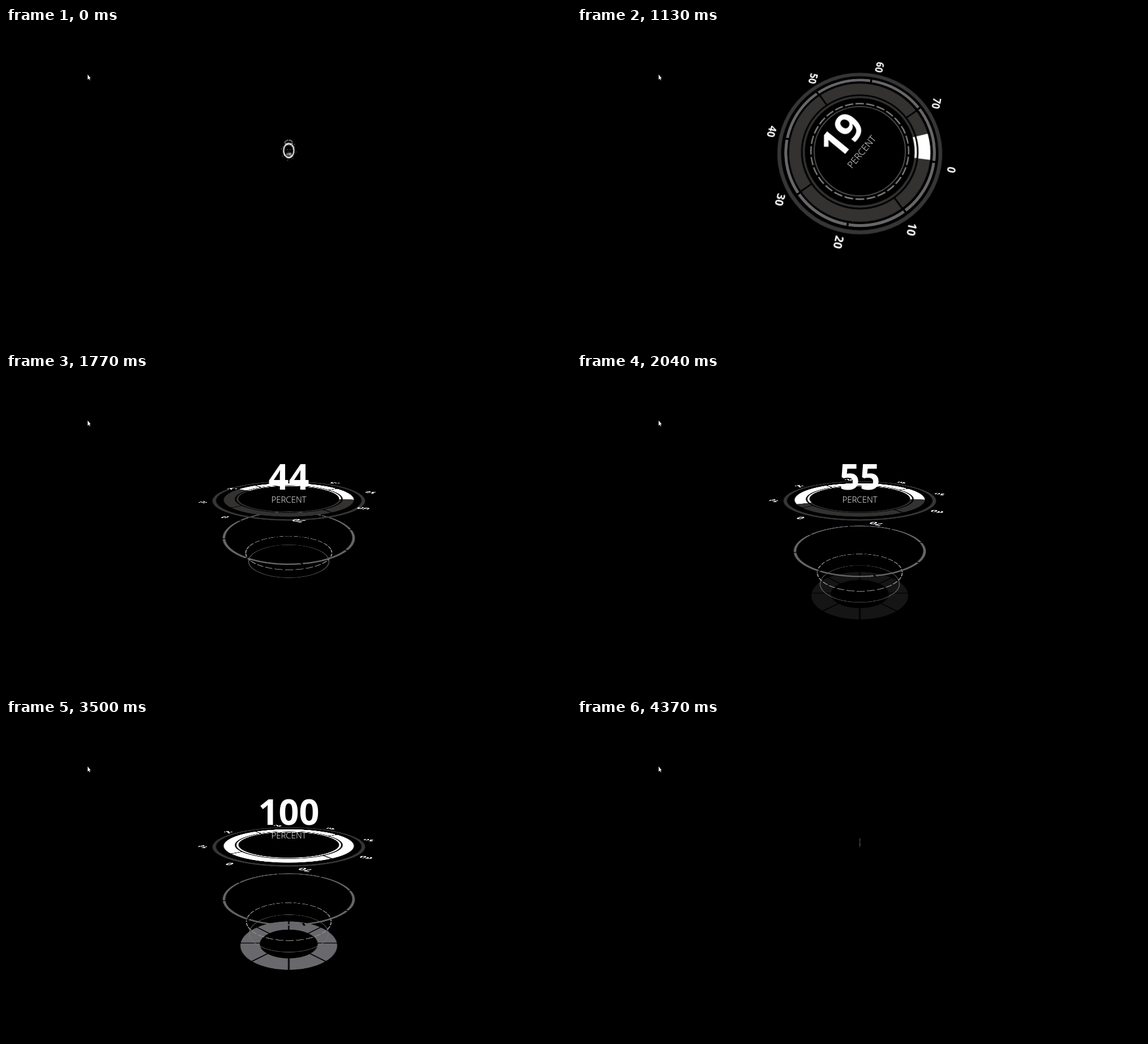
Write an HTML page that moves like this. It is 998 by 561 pixels and loops after 4.4 s.

```html
<!DOCTYPE html>
<html lang="en">
<head>
<meta charset="utf-8">
<title>Percent dial</title>
<style>
html, body { margin: 0; width: 100%; height: 100%; overflow: hidden; background: #000; }
svg { position: absolute; overflow: visible; }
.layer { left: -200px; top: -200px; width: 400px; height: 400px; transform-origin: 200px 200px; }
circle { fill: none; }
text { fill: #fff; text-anchor: middle; font-family: "Open Sans", "Noto Sans", sans-serif; }
</style>
</head>
<body>
<script>
const LOOP = 4400;
const EXIT = 3684, GONE = 4833, HEAD = 4267; // shrink starts, ends; phase at load
const SWEEP_FROM = 8;

const lerp = (a, b, u) => a + (b - a) * u;
const clamp = (v, a = 0, b = 1) => Math.min(b, Math.max(a, v));
const smooth = u => u * u * (3 - 2 * u);

// Smooth curve through [time, value] points, flat at both ends
function curve(...pts) {
  const last = pts.length - 1;
  const slope = i => i < 1 || i >= last ? 0 :
    (pts[i + 1][1] - pts[i - 1][1]) / (pts[i + 1][0] - pts[i - 1][0]);
  return t => {
    if (t <= pts[0][0]) return pts[0][1];
    if (t >= pts[last][0]) return pts[last][1];
    const i = pts.findIndex(p => p[0] > t) - 1;
    const [t0, a] = pts[i], [t1, b] = pts[i + 1];
    const d = t1 - t0, u = (t - t0) / d;
    return lerp(a, b, smooth(u)) +
      d * u * (1 - u) * ((1 - u) * slope(i) - u * slope(i + 1));
  };
}

const grow = curve([566, 0], [830, .585], [1090, 1.08], [1400, 1]);
const height = curve([566, 340], [830, 321], [1090, 222], [1300, 217.5]);
const dialTilt = curve([1090, 1], [1480, .253]);
const ringBump = curve([1200, 0], [1530, .175], [1900, 0]);
const ringSize = curve([1100, 1.055], [1530, 1.01], [1900, 1]);
const ringTurn = curve([566, -110], [830, -2.5], [1530, 317], [1950, 348.6]);
const labelTilt = curve([1090, 1], [1380, .25], [1530, .154], [1900, .253]);
const labelSkew = curve([1090, 0], [1400, -12], [1530, -10.4], [1900, 0]);
const labelTurn = curve([566, -60], [830, 11.5], [1530, 209], [1900, 216]);
const textTurn = curve([566, -120], [830, -90], [1530, -1.5], [1700, 0]);
const yawing = curve([566, 28], [830, 21], [1200, 0]);
const baseFade = curve([1980, 0], [2040, .2], [2450, 1]);

function addLayer(markup) {
  document.body.insertAdjacentHTML("beforeend",
    `<svg class="layer" viewBox="-200 -200 400 400">${markup}</svg>`);
  return document.body.lastElementChild;
}

const circle = (r, w, color, extra = "") =>
  `<circle r="${r}" stroke="${color}" stroke-width="${w}" ${extra}/>`;

// Radial black cuts between two radii
const cuts = (n, from, r0, r1, w) => Array.from({ length: n }, (_, i) =>
  `<path d="M0 ${-r0}V${-r1}" stroke="#000" stroke-width="${w}" transform="rotate(${from + i * 360 / n})"/>`).join("");

const sweepArc = (r, w) => circle(r, w, "#fff",
  `class="sweep" pathLength="360" transform="rotate(${SWEEP_FROM}) scale(1 -1)"`);

const labels = Array.from({ length: 8 }, (_, i) => {
  const a = i * Math.PI / 4;
  return `<text x="${148 * Math.sin(a)}" y="${-148 * Math.cos(a) + 6}" font-size="17" font-weight="700">${i * 10}</text>`;
}).join("");

const base = addLayer(circle(68, 34, "#69686c") + cuts(8, 0, 48, 88, 2.6));
const thin = addLayer(circle(69.5, 1.1, "#777"));
const dashed = addLayer(circle(74.5, 2, "#8c8c8c", 'pathLength="280" stroke-dasharray="7.8 2.2"'));
const ring = addLayer(circle(113.2, 4.4, "#67676a") + cuts(8, 0, 109, 118, 3));
const dial = addLayer(
  circle(129.5, 6, "#363637") +
  circle(104, 19, "#333231") + circle(90, 3.5, "#333231") +
  sweepArc(104, 19) + sweepArc(90, 3.5) +
  cuts(4, 54.5, 93, 115, 2.6));
const marks = addLayer(labels);
const readout = addLayer(
  '<text class="num" font-size="63" font-weight="700"></text>' +
  '<text class="unit" font-size="15" font-weight="300">PERCENT</text>');
const num = readout.querySelector(".num");
const unit = readout.querySelector(".unit");
const sweeps = dial.querySelectorAll(".sweep");

document.body.insertAdjacentHTML("beforeend",
  `<svg style="left:0;top:0" width="998" height="561">
    <path d="M144.3 82v9l2-1.8 1.5 3 1-.5-1.5-2.9h2.3z" fill="#fff"/></svg>`);

// Plane seen in perspective: k is its flattening, yaw turns it sideways
function place(layer, stage, { y = 0, size = 1, k = 1, yaw = 0, skew = 0, turn = 0 }) {
  const depth = .00145, a = yaw * Math.PI / 180;
  const qx = depth * Math.sin(a), qy = depth * Math.sqrt(Math.max(0, 1 - k * k));
  layer.style.transform = `${stage} translateY(${y}px) skewY(${skew}deg) ` +
    `matrix3d(${size * Math.cos(a)},0,0,${-qx}, 0,${size * k},0,${-qy}, 0,0,1,0, 0,0,0,1) rotate(${turn}deg)`;
}

function draw(time) {
  const t = time < GONE - HEAD ? time + HEAD : time;

  const shrink = t > EXIT ? ((GONE - t) / (GONE - EXIT)) ** 3 : 1;
  const flip = smooth(clamp((t - 3720) / (HEAD - 3720)));
  const spin = Math.max(0, t - 3740) * .42 * Math.PI / 180;
  const s = grow(t) * shrink;
  const gy = height(t) - 1.5 * (1 - shrink);
  const stage = `translate(499.5px,${gy.toFixed(3)}px) scale(${(s * Math.cos(spin)).toFixed(5)},${s.toFixed(5)})`;

  // Lower layers drop away from the dial
  const drop = 1 - (1 - clamp((t - 1411) / 786)) ** 2;
  const fall = drop * lerp(1, -.7, flip);
  const size = lerp(1.055, 1, drop);
  const flat = dialTilt(t);
  const yaw = yawing(t);
  const open = k => lerp(k, 1, flip);
  const low = (depth, k, more) => ({ y: depth * fall, k: lerp(flat, k, drop), size, ...more });

  place(base, stage, low(176, .496, { size: 1 }));
  base.style.opacity = baseFade(t);
  place(thin, stage, low(156, .471));
  place(dashed, stage, low(135, .444, { turn: ringTurn(t) / 2 }));
  place(ring, stage, low(92, .39, {
    k: lerp(flat, .39, drop) + ringBump(t), size: ringSize(t), yaw, turn: ringTurn(t)
  }));
  place(dial, stage, { k: open(flat) });
  place(marks, stage, {
    k: open(labelTilt(t)), yaw, skew: labelSkew(t), turn: labelTurn(t)
  });
  place(readout, stage, { turn: textTurn(t) + 180 * flip });

  const sweep = clamp((t - 1025) * .208, 4, 360);
  for (const arc of sweeps) arc.setAttribute("stroke-dasharray", `${sweep} ${sweep < 360 ? 400 : 0}`);

  const percent = Math.floor(clamp((t - 645) / 25.2, 0, 100));
  const lift = percent === 100 ? -18.5 : 0;
  num.textContent = String(percent).padStart(2, "0");
  num.setAttribute("y", -14 + lift);
  unit.setAttribute("y", 9.5 + lift);
}

const start = performance.now();
function tick() {
  draw((performance.now() - start) % LOOP);
  requestAnimationFrame(tick);
}
tick();
</script>
</body>
</html>
```
